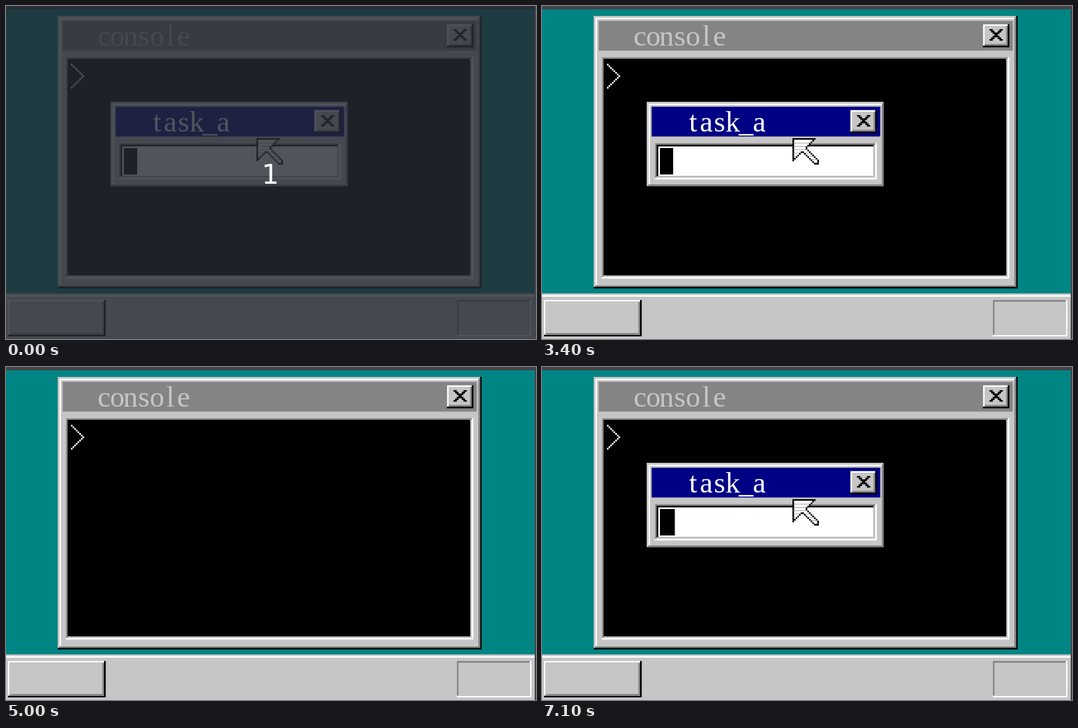
Write an HTML page with a canvas that moves like this. It is 800 by 504 pixels and loops after 7.5 s.

```html
<!DOCTYPE html>
<html>
<head>
<meta charset="utf-8">
<style>
  html, body { margin: 0; width: 100%; height: 100%; overflow: hidden; background: #444448; }
  canvas { display: block; }
</style>
</head>
<body>
<canvas id="stage" width="800" height="504"></canvas>
<script>
const ctx = document.getElementById('stage').getContext('2d');
const W = 320, H = 200, LOOP = 7500;
const BLACK = '#000', WHITE = '#fff', LIGHT = '#c6c6c6', DARK = '#848484';
const TEAL = '#008484', NAVY = '#000084';

// start time, task window state, caret shown, stray line shown
const timeline = [
  [0, 'whole', 1, 0], [500, 'whole', 0, 0], [1400, 'whole', 1, 0],
  [2500, 'whole', 0, 0], [3400, 'whole', 1, 0],
  [3950, 'gone', 0, 0], [4000, 'torn', 1, 0], [4050, 'whole', 1, 0],
  [4500, 'whole', 0, 0], [4550, 'torn', 0, 0],
  [5000, 'gone', 0, 0], [5100, 'whole', 1, 1], [5650, 'whole', 0, 1],
  [6000, 'gone', 0, 1], [6200, 'whole', 1, 1], [6550, 'whole', 0, 1],
  [7100, 'whole', 1, 1]
];

// Fill a box; both corners are inclusive low-resolution pixels.
function box(color, x0, y0, x1, y1) {
  ctx.fillStyle = color;
  ctx.fillRect(x0, y0, x1 - x0 + 1, y1 - y0 + 1);
}

// One character per 8-pixel cell.
function cells(text, color, x, y) {
  ctx.fillStyle = color;
  ctx.font = '17.6px "Liberation Serif", serif';
  ctx.textAlign = 'center';
  [...text].forEach((ch, i) => ctx.fillText(ch, x + 8 * i + 4, y + 14));
}

function closeButton(x, y) {
  box(BLACK, x, y, x + 15, y + 13);
  box(WHITE, x, y, x + 14, y + 12);
  box(DARK, x + 1, y + 1, x + 14, y + 12);
  box(LIGHT, x + 1, y + 1, x + 13, y + 11);
  for (let i = 0; i < 7; i++) {
    const d = Math.min(i, 6 - i);
    for (const cx of [x + 4 + d, x + 10 - d]) box(BLACK, cx, y + 3 + i, cx + 1, y + 3 + i);
  }
}

function textBox(color, x, y, w, h) {
  const r = x + w, b = y + h;
  box(WHITE, x - 3, y - 3, r + 2, b + 2);
  box(DARK, x - 3, y - 3, r + 1, b + 1);
  box(LIGHT, x - 2, y - 2, r + 1, b + 1);
  box(BLACK, x - 2, y - 2, r, b);
  box(color, x - 1, y - 1, r, b);
}

function windowFrame(x, y, w, h, title, barColor, textColor) {
  const r = x + w - 1, b = y + h - 1;
  box(BLACK, x, y, r, b);
  box(LIGHT, x, y, r - 1, b - 1);
  box(DARK, x + 1, y + 1, r - 1, b - 1);
  box(WHITE, x + 1, y + 1, r - 2, b - 2);
  box(LIGHT, x + 2, y + 2, r - 2, b - 2);
  box(barColor, x + 3, y + 3, r - 3, y + 20);
  cells(title, textColor, x + 24, y + 4);
  closeButton(r - 20, y + 5);
}

function desktop() {
  box(TEAL, 0, 0, W - 1, H - 29);
  box(LIGHT, 0, H - 28, W - 1, H - 1);
  box(WHITE, 0, H - 27, W - 1, H - 27);

  box(BLACK, 2, H - 24, 60, H - 3);
  box(WHITE, 2, H - 24, 59, H - 4);
  box(DARK, 3, H - 23, 59, H - 4);
  box(LIGHT, 3, H - 23, 58, H - 5);

  box(WHITE, W - 47, H - 24, W - 3, H - 3);
  box(DARK, W - 47, H - 24, W - 4, H - 4);
  box(LIGHT, W - 46, H - 23, W - 4, H - 4);
}

function consoleWindow() {
  windowFrame(32, 4, 256, 165, 'console', DARK, LIGHT);
  textBox(BLACK, 40, 32, 240, 128);
  for (let i = 0; i < 8; i++) {
    box(WHITE, 40 + i, 33 + i, 40 + i, 33 + i);
    box(WHITE, 40 + i, 47 - i, 40 + i, 47 - i);
  }
}

function taskWindow(torn, caret, line) {
  windowFrame(64, 56, 144, 52, 'task_a', NAVY, WHITE);
  textBox(WHITE, 72, 84, 128, 16);
  if (caret) box(BLACK, 72, 84, 79, 99);
  if (line) box(BLACK, 80, 84, 80, 99);
  if (torn) {
    box(BLACK, 64, 55.6, 207, 57);
    box(BLACK, 64, 58, 153, 58);
  }
}

function pointer(x, y) {
  const span = (row, a, b) => {
    box(BLACK, x + a, y + row, x + b, y + row);
    if (row % 15 && b - a > 1) box(WHITE, x + a + 1, y + row, x + b - 1, y + row);
  };
  for (let row = 0; row < 16; row++) {
    if (row === 6 || row === 7) span(row, 0, row + 2);
    else if (row < 14) span(row, 0, 13 - row);
    if (row > 7) span(row, row - 2, Math.min(15, row + 2));
  }
}

function dimmed() {
  ctx.fillStyle = 'rgba(38, 42, 50, 0.8)';
  ctx.fillRect(0, 0, 798, 504);
  ctx.fillStyle = WHITE;
  ctx.font = '41px "DejaVu Sans", sans-serif';
  ctx.textAlign = 'center';
  ctx.fillText('1', 399, 269);
}

function draw(now) {
  const t = now % LOOP;
  const [, state, caret, line] = timeline.findLast(step => step[0] <= t);
  ctx.setTransform(1, 0, 0, 1, 0, 0);
  ctx.fillStyle = '#444448';
  ctx.fillRect(0, 0, 800, 504);
  ctx.setTransform(2.5, 0, 0, 2.5, -2, 5);
  desktop();
  consoleWindow();
  if (state !== 'gone') {
    taskWindow(state === 'torn', caret, line);
    pointer(152, 78);
  }
  ctx.setTransform(1, 0, 0, 1, 0, 0);
  if (t < 400) dimmed();
}

const start = performance.now();
function tick() {
  draw(performance.now() - start);
  requestAnimationFrame(tick);
}
tick();
</script>
</body>
</html>
```
